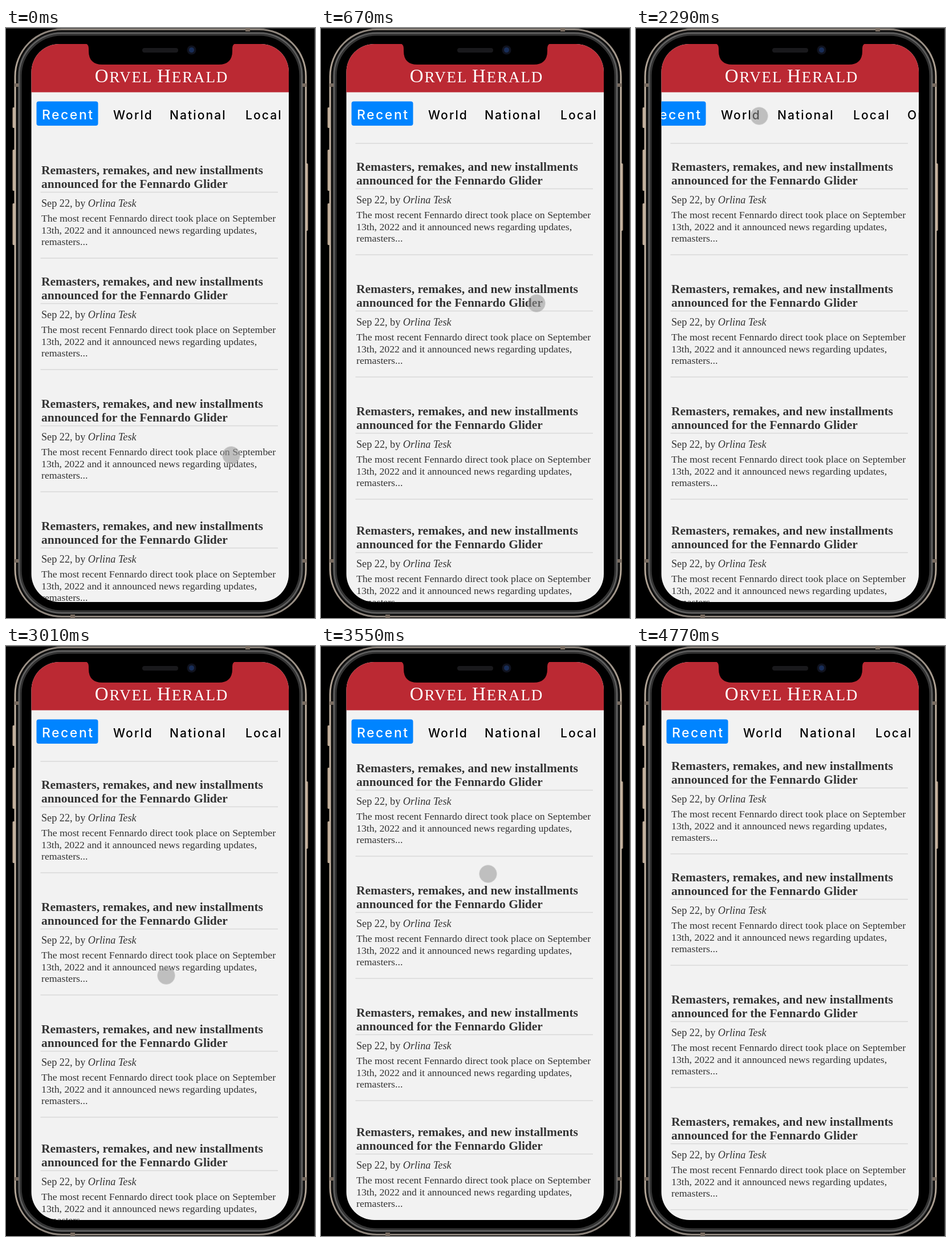
These frames come from a looping animation (542 px wide and 1033 px high, 5450 ms). An HTML page:

```html
<!DOCTYPE html>
<html lang="en">
<head>
<meta charset="utf-8">
<title>News app</title>
<style>
html, body { margin: 0; width: 100%; height: 100%; overflow: hidden; background: #000; }
svg { display: block; }
.masthead { font: 27px "Liberation Serif", serif; letter-spacing: 1.9px; fill: #fff; text-anchor: middle; }
.masthead .cap { font-size: 33px; }
.tab { font: 500 21px Inter, sans-serif; letter-spacing: 2.1px; fill: #000; }
.tab.active { font-size: 23px; letter-spacing: 2.5px; fill: #fff; }
.article { font: 17.75px "Liberation Serif", serif; fill: #333; }
.article .headline { font-size: 21.5px; font-weight: bold; }
.article .byline { font-size: 18.2px; }
.article path { stroke: #d8d8d8; stroke-width: 1.5; }
</style>
</head>
<body>
<svg width="542" height="1033" viewBox="0 0 542 1033">
  <defs>
    <clipPath id="screen"><rect x="44.5" y="28" width="451.5" height="977" rx="49"/></clipPath>
    <clipPath id="feed"><rect x="44" y="189" width="452" height="816"/></clipPath>
    <linearGradient id="metal" x2="0" y2="1">
      <stop stop-color="#8b837b"/><stop offset=".1" stop-color="#c3b3a2"/>
      <stop offset=".9" stop-color="#c3b3a2"/><stop offset="1" stop-color="#8b837b"/>
    </linearGradient>
    <linearGradient id="button">
      <stop stop-color="#55483d"/><stop offset=".5" stop-color="#d8c4ae"/><stop offset="1" stop-color="#6a5a4c"/>
    </linearGradient>
  </defs>

  <path d="M0 .5H541.5V1033" fill="none" stroke="#4a4a4a"/>
  <g fill="url(#button)">
    <rect x="11" y="139" width="5" height="36" rx="2"/>
    <rect x="11" y="213" width="5" height="72" rx="2"/>
    <rect x="11" y="307" width="5" height="73" rx="2"/>
    <rect x="525" y="237" width="5" height="118" rx="2"/>
  </g>
  <rect x="16" y="2.5" width="510" height="1028" rx="82" fill="#0a0a0a" stroke="url(#metal)" stroke-width="3"/>
  <rect x="24" y="10" width="494" height="1013" rx="74" fill="#000" stroke="#343434" stroke-width="7"/>
  <rect x="23" y="9" width="496" height="1015" rx="75" fill="none" stroke="#666" stroke-width="2"/>
  <path d="M420 3h8M113 1030h8M14 100h8M520 100h8M14 933h8M520 933h8" stroke="#786b60" stroke-width="6"/>

  <g clip-path="url(#screen)">
    <rect x="44" y="28" width="452" height="977" fill="#f2f2f2"/>
    <g clip-path="url(#feed)"><g id="articles"></g></g>
    <g id="tabs"><rect x="53.5" y="128.5" width="108" height="42.500" rx="4" fill="#0084ff"/></g>
    <rect x="44" y="28" width="452" height="84.500" fill="#bb2933"/>
    <text class="masthead" x="273" y="95"><tspan class="cap">O</tspan>RVEL <tspan class="cap">H</tspan>ERALD</text>
    <path d="M137 27q8 0 8 9v4q0 24 24 24h204q24 0 24-24v-4q0-9 8-9z"/>
  </g>
  <rect x="239" y="35" width="63" height="8" rx="4" fill="#19191c"/>
  <circle cx="325.500" cy="38.500" r="8" fill="#10131f"/>
  <circle cx="325.500" cy="38.500" r="4.500" fill="#182d58"/>

  <circle id="touch" r="15.500" fill="#969696" fill-opacity=".55" stroke="#ddd" stroke-opacity=".6"/>
</svg>
<script>
const [articles, tabs, touch] = ['articles', 'tabs', 'touch'].map(id => document.getElementById(id));

const line = (y, text, kind = '') => `<text class="${kind}" x="62" y="${y}">${text}</text>`;
const rule = y => `<path d="M60.5 ${y}H477"/>`;
const article = (top, i, all) => `<g class="article" transform="translate(0 ${top})">
  ${line(256, 'Remasters, remakes, and new installments', 'headline')}
  ${line(280, 'announced for the Fennardo Glider', 'headline')}
  ${rule(287.5)}
  ${line(312.5, 'Sep 22, by <tspan font-style="italic">Orlina Tesk</tspan>', 'byline')}
  ${line(339, 'The most recent Fennardo direct took place on September')}
  ${line(359.5, '13th, 2022 and it announced news regarding updates,')}
  ${line(380, 'remasters...')}
  ${i < all.length - 1 ? rule(403) : ''}</g>`;
articles.innerHTML = [0, 195, 409, 623, 832].map(article).join('');

const tabX = { Recent: 63, World: 188, National: 287, Local: 420, Orvel: 515 };
tabs.innerHTML += Object.entries(tabX).map(([name, x]) =>
  `<text class="tab ${name === 'Recent' ? 'active' : ''}" x="${x}" y="160">${name}</text>`).join('');

// The picture refreshes in beats; all motion below is measured in beats.
const LOOP = 5450, FIRST_BEAT = 380, BEAT = 135;

// Smooth step from 0 to 1 between two beats.
function glide(from, to, beat) {
  const k = Math.min(1, Math.max(0, (beat - from) / (to - from)));
  return k * k * (3 - 2 * k);
}

// Flick up, pull past the end, bounce, swipe back to the top, settle.
const scrollAt = b => 201 * glide(-1, 2, b) + 48 * glide(19, 21, b) - 19 * glide(22, 23, b)
  - 203 * glide(23, 27, b) + 12 * glide(27, 29, b);

// Swipe left, ease off, swipe back slightly too far, settle.
const tabShiftAt = b => -88 * glide(8, 9, b) + 7 * glide(11, 13, b) + 84 * glide(13, 15, b) - 3 * glide(15, 19, b);

// Finger stops: beat, x, y
const stops = [[-1, 395, 748], [2, 378, 482], [4, 351, 425], [6, 278, 170], [8, 280, 166], [9, 155, 153],
  [12, 135, 153], [16, 297, 155], [18, 282, 563], [19, 281, 577], [23, 293, 399], [27, 312, 715],
  [30, 333, 841], [32, 545, 1190]];

function touchAt(beat) {
  let [, x, y] = stops[0];
  for (let i = 1; i < stops.length; i++) {
    const [from, x0, y0] = stops[i - 1], [to, x1, y1] = stops[i];
    const k = Math.min(1, Math.max(0, (beat - from) / (to - from)));
    x += (x1 - x0) * k;
    y += (y1 - y0) * k;
  }
  return [x, y];
}

const move = (el, x, y) => el.setAttribute('transform', `translate(${x} ${y})`);
const start = performance.now();

function draw() {
  const t = (performance.now() - start) % LOOP;
  const beat = Math.max(-1, Math.floor((t - FIRST_BEAT) / BEAT));
  move(articles, 0, -scrollAt(beat));
  move(tabs, tabShiftAt(beat), 0);
  move(touch, ...touchAt(beat));
  requestAnimationFrame(draw);
}
draw();
</script>
</body>
</html>
```
